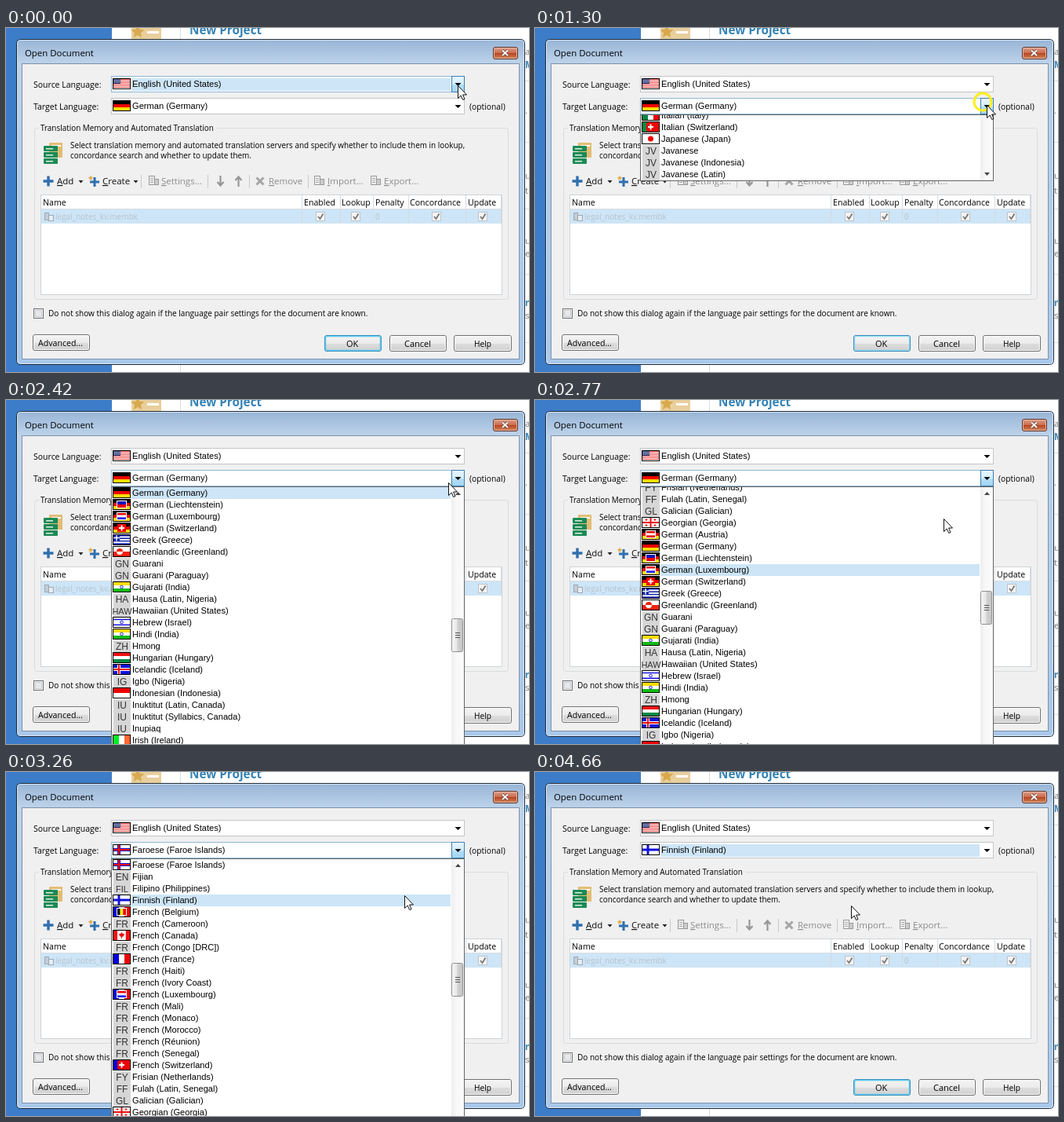
Recreate the animation shown at these times as an HTML page. Size 667 by 438 pixels, loop 4730 ms.

```html
<!DOCTYPE html>
<html lang="en">
<head>
<meta charset="utf-8">
<title>Open Document</title>
<style>
html, body { margin: 0; width: 100%; height: 100%; overflow: hidden; background: #fff; }
svg { display: block; width: 667px; height: 438px; }
text { white-space: pre; }
.ui { font-family: "Open Sans", "Noto Sans", sans-serif; }
.ls { font-family: "Liberation Sans", Arial, sans-serif; font-size: 11.1px; }
</style>
</head>
<body>
<svg id="stage" viewBox="0 0 667 438"></svg>
<script>
const LOOP = 4730, ROW = 15, LIST_H = 452, GERMAN = 23;
const PICK = '#cde5f7';

// name, flag: layers of "kind colours", or a letter code
const langs = `Faroese (Faroe Islands);x #fff #11c #e11
Fijian;EN
Filipino (Philippines);FIL
Finnish (Finland);x #fff #11d
French (Belgium);v #00d #fff #e00|+v #000 #fe0 #e00
French (Cameroon);FR
French (Canada);v #e11 #fff #fff #e11|m #e11
French (Congo [DRC]);FR
French (France);v #00d #fff #e00
French (Haiti);FR
French (Ivory Coast);FR
French (Luxembourg);v #00d #fff #e00|+h #e00 #fff #22e
French (Mali);FR
French (Monaco);FR
French (Morocco);FR
French (Réunion);FR
French (Senegal);FR
French (Switzerland);v #00d #e00 #e00|+s #e00
Frisian (Netherlands);FY
Fulah (Latin, Senegal);FF
Galician (Galician);GL
Georgian (Georgia);g #e11
German (Austria);h #000 #e00 #fd0|+h #e00 #fff #e00
German (Germany);h #000 #e00 #fd0
German (Liechtenstein);h #000 #e00 #fd0|+h #11b #e00
German (Luxembourg);h #000 #e00 #fd0|+h #e00 #fff #22e
German (Switzerland);h #000 #e00 #fd0|+s #e00
Greek (Greece);h #12a #fff #12a #fff #12a #fff #12a|k #12a
Greenlandic (Greenland);h #fff #e21|d #e21
Guarani;GN
Guarani (Paraguay);GN
Gujarati (India);h #fd0 #fff #1b1|r #22c
Hausa (Latin, Nigeria);HA
Hawaiian (United States);HAW
Hebrew (Israel);h #fff #11d #fff #fff #fff #11d #fff|r #11d
Hindi (India);h #fd0 #fff #1b1|r #22c
Hmong;ZH
Hungarian (Hungary);h #e11 #fff #084
Icelandic (Iceland);x #11d #fff #e11
Igbo (Nigeria);IG
Indonesian (Indonesia);h #e00 #fff
Inuktitut (Latin, Canada);IU
Inuktitut (Syllabics, Canada);IU
Inupiaq;IU
Irish (Ireland);v #0e2 #fff #f63
isiXhosa (South Africa);XH
isiZulu (South Africa);ZU
Italian (Italy);v #084 #fff #e00
Italian (Switzerland);v #084 #e00 #e00|+s #e00
Japanese (Japan);h #fff|o #e00
Javanese;JV
Javanese (Indonesia);JV
Javanese (Latin);JV`.split('\n').map(s => s.split(';'));

const rect = (x, y, w, h, fill, more = '') =>
  `<rect x="${x}" y="${y}" width="${w}" height="${h}" fill="${fill}" ${more}/>`;
const frame = (x, y, w, h, fill, line, r = 0, more = '') =>
  rect(x + .5, y + .5, w - 1, h - 1, fill, `stroke="${line}" rx="${r}" ${more}`);
const path = (d, fill, more = '') => `<path d="${d}" fill="${fill}" ${more}/>`;
const line = (d, color, w = 1, more = '') => path(d, 'none', `stroke="${color}" stroke-width="${w}" ${more}`);
const dot = (x, y, r, fill, more = '') => `<circle cx="${x}" cy="${y}" r="${r}" fill="${fill}" ${more}/>`;
const ui = (s, x, y, size = 10, fill = '#000', more = '') =>
  `<text class="ui" x="${x}" y="${y}" font-size="${size}" fill="${fill}" ${more}>${s}</text>`;
const item = (s, x, y) => `<text class="ls" x="${x}" y="${y}">${s}</text>`;
const group = (s, more = '') => `<g ${more}>${s}</g>`;
const grad = (id, dir, ...stops) => `<linearGradient id="${id}" ${dir === 'v' ? 'x2="0" y2="1"' : ''}>` +
  stops.map(([o, c]) => `<stop offset="${o}" stop-color="${c}"/>`).join('') + '</linearGradient>';

function stripes(dir, cols, x, y, w, h) {
  const n = cols.length;
  return cols.map((c, i) => dir === 'h'
    ? rect(x, y + i * h / n, w, h / n, c)
    : rect(x + i * w / n, y, w / n, h, c)).join('');
}

const plus = (x, y, r, c, w) => line(`M${x - r} ${y}h${2 * r}M${x} ${y - r}v${2 * r}`, c, w);

function layer(spec) {
  const [kind, ...c] = spec.split(' ');
  switch (kind) {
    case 'h': case 'v': return stripes(kind, c, 1, 1, 21, 12);
    case '+h': case '+v':
      return rect(5, 2, 13, 10, '#fff') + stripes(kind[1], c, 6, 3, 11, 8);
    case '+s': return rect(6, 2, 11, 10, c[0]) + plus(11.5, 7, 3.5, '#fff', 2);
    case 'x': return rect(1, 1, 21, 12, c[0]) + line('M1 7h21M8 1v12', c[1], c[2] ? 4 : 3) +
      (c[2] ? line('M1 7h21M8 1v12', c[2], 2) : '');
    case 'g': return rect(1, 1, 21, 12, '#fff') + line('M1 7h21M11.5 1v12', c[0], 2) +
      [6, 17].map(x => plus(x, 3.5, 1.5, c[0], 1) + plus(x, 10.5, 1.5, c[0], 1)).join('');
    case 'k': return rect(1, 1, 8, 7, c[0]) + plus(5, 4.5, 4, '#fff', 1.4);
    case 'd': return path('M5 7a4 4 0 0 1 8 0z', c[0]) + path('M5 7a4 4 0 0 0 8 0z', '#fff');
    case 'o': return dot(11.5, 7, 3.5, c[0]);
    case 'r': return dot(11.5, 7, 1.8, '#fff', `stroke="${c[0]}"`);
    case 'm': return path('M11.5 3l1.5 2 2 0-1 3-2 1v2h-1v-2l-2-1-1-3 2 0z', c[0]);
    case 'u': return stripes('h', Array.from({length: 12}, (_, i) => i % 2 ? '#fff' : '#e44'), 1, 1, 21, 12) +
      rect(1, 1, 9, 6, '#458') + line('M2 2.5h7M2 4.5h7', '#bbd', 1, 'stroke-dasharray="1 1"');
  }
}

function flag(spec, x, y) {
  const art = /^[A-Z]+$/.test(spec)
    ? rect(1, 0, 22, 15, '#d6d6d6') +
      `<text class="ls" x="12" y="11.5" text-anchor="middle" fill="#333" style="font-size:${spec.length > 2 ? 11 : 12}px">${spec}</text>`
    : spec.split('|').map(layer).join('') + frame(0, 0, 23, 14, 'none', '#000');
  return group(art, `transform="translate(${x} ${y})"`);
}

function combo(id, y) {
  return frame(134, y, 451, 21, '#fff', '#c3c5c9') +
    rect(160, y + 3, 407, 16, PICK, `id="${id}Pick"`) +
    `<g id="${id}Hot">` + frame(134, y, 451, 21, 'none', '#8fb8d6') +
    frame(568, y, 17, 21, 'url(#hot)', '#3c7fb1') + '</g>' +
    path(`M572.5 ${y + 9}h8l-4 4z`, '#000') + `<g id="${id}Value"></g>`;
}

function button(s, x, y, w, tx, size, border = '#707070') {
  return frame(x, y, w, 21, 'url(#btn)', border, 2.5) +
    frame(x + 1, y + 1, w - 2, 19, 'none', '#fbfbfb', 2) + ui(s, tx, y + 14.5, size);
}

const tool = (s, x, color = '#8b8b8b') =>
  ui(`<tspan text-decoration="underline">${s[0]}</tspan>${s.slice(1)}`, x, 199, 11.5, color);
const sheet = (x, y) => frame(x, y, 8, 12, '#eee', '#999') +
  line(`M${x + 2} ${y + 3.5}h4m-4 2.5h4m-4 2.5h4`, '#aaa') + frame(x + 7, y + 4, 6, 8, '#ccc', '#999');
const check = x => frame(x - 6, 234, 12, 12, '#f4f4f4', '#bfc3c7') +
  line(`M${x - 3} 240l2.5 3 4-6.5`, '#777', 1.8);
const star = (x, y, r, c) => path('M' + Array.from({length: 10}, (_, i) => {
  const a = i * Math.PI / 5 - Math.PI / 2, k = i % 2 ? r * .45 : r;
  return `${(x + k * Math.cos(a)).toFixed(1)} ${(y + k * Math.sin(a)).toFixed(1)}`;
}).join('L') + 'z', c);

function backdrop() {
  const bits = [['a', 34, 0], ['M', 51, 1], ['.', 109, 0], ['ur', 192, 0], ['t', 211, 0],
    ['u', 275, 0], ['e', 291, 0], ['r', 354, 1], ['s', 370, 0]];
  return rect(0, 0, 667, 438, '#fff') + rect(0, 0, 135, 438, '#3d7cc8') +
    rect(160, 0, 38, 14, '#e8cf9c') + rect(180, 4, 15, 3, '#fff') + star(168, 5, 9, '#d9a94e') +
    line('M222.5 0V438', '#dcdcdc') +
    ui('New Project', 234, 8, 15.3, '#3583b5', 'font-weight="700"') +
    line('M660 67.5h7M660 145.5h7M660 230.5h7M660 313.5h7M660 400.5h7', '#ddd') +
    bits.map(([s, y, b]) => ui(s, 662, y, 11.5, b ? '#3583b5' : '#777', b ? 'font-weight="700"' : '')).join('');
}

function dialog() {
  const heads = [['Name', 47], ['Enabled', 380], ['Lookup', 428], ['Penalty', 471], ['Concordance', 515], ['Update', 589]];
  return frame(13, 14, 649, 415, 'url(#glass)', '#1b2836', 5) +
    frame(14, 15, 647, 413, 'none', '#d6e6f6', 4) +
    ui('Open Document', 24, 36, 11.4) +
    frame(621, 24, 32, 16, 'url(#close)', '#5f3328', 2.5) + frame(622, 25, 30, 14, 'none', '#eab7a4', 2) +
    line('M633 28.500l7 6.500m0-6.500l-7 6.500', '#5e3a33', 3.400) + line('M633 28.500l7 6.500m0-6.500l-7 6.500', '#fff', 2) +
    frame(20, 45, 635, 377, '#f0f0f0', '#7c92aa') +
    ui('Source Language:', 35, 76, 10.5) + ui('Target Language:', 35, 104, 10.5) +
    ui('(optional)', 591, 104, 10.3) +
    combo('src', 61) + combo('dst', 89) +
    frame(36, 127, 605, 219, 'none', '#d8dbde', 3) + rect(42, 124, 227, 7, '#f0f0f0') +
    ui('Translation Memory and Automated Translation', 44, 131, 9.92) +
    rect(55, 146, 17, 19, '#e2bd75') + rect(58, 149, 12, 2, '#fff') +
    [0, 1, 2].map(i => rect(48, 150 + i * 8, 18, 7, '#1c8a55', 'rx="1"') + rect(51, 153 + i * 8, 9, 1.5, '#d9f0e2')).join('') +
    ui('Select translation memory and automated translation servers and specify whether to include them in lookup,', 82, 153, 9.93) +
    ui('concordance search and whether to update them.', 82, 166, 9.93) +
    plus(54, 195, 6.5, '#2f6fad', 3.4) + tool('Add', 65, '#111') + path('M92.5 194h6l-3 3.5z', '#222') +
    plus(113, 196, 6, '#2f6fad', 3) + star(108, 191, 3.6, '#e0ab4a') + tool('Create', 123, '#111') + path('M162.5 194h6l-3 3.5z', '#222') +
    line('M172.5 187v17M257.5 187v17M310.5 187v17M385.5 187v17', '#c9c9c9') +
    sheet(182, 188) + tool('Settings...', 198) +
    line('M273.5 188v12m-4-4l4 4.5 4-4.5', '#979797', 2.2) + line('M296.5 202v-12m-4 4l4-4.5 4 4.5', '#979797', 2.2) +
    line('M319.5 190.5l9 9m0-9l-9 9', '#a5a5a5', 3) + tool('Remove', 335) +
    sheet(393, 188) + tool('Import...', 410) + sheet(465, 188) + tool('Export...', 482) +
    frame(44, 212, 589, 128, '#fff', '#cfd4d9') +
    rect(45, 231, 587, 18, PICK) + line('M45 230.5h587', '#d9dde2') +
    line('M377.5 213v36M426.5 213v36M468.5 213v36M513.5 213v36M586.5 213v36M631.5 213v36', '#d5dbe1') +
    heads.map(([s, x]) => ui(s, x, 226, 10.6)).join('') +
    frame(49, 235, 6, 10, '#c3cdd6', '#9ba8b3') + frame(54, 238, 7, 8, '#e8edf1', '#9ba8b3') +
    ui('legal_notes_kv.membk', 63, 244, 10, '#b6c3ce') + ui('0', 471, 244, 10, '#b6c3ce') +
    [401, 446, 549, 608].map(check).join('') +
    frame(35, 357, 13, 13, '#f5f5f5', '#6f7072') + frame(37, 359, 9, 9, '#e6e8ea', '#c4c8cc') +
    ui('Do not show this dialog again if the language pair settings for the document are known.', 54, 367, 10.03) +
    button('Advanced...', 34, 390, 73, 41, 10.6) +
    button('OK', 406, 391, 73, 434, 11, '#3c7fb1') +
    frame(407, 392, 71, 19, 'none', '#48c8f2', 2, 'id="glow" stroke-width="1.6"') +
    button('Cancel', 489, 391, 73, 508, 11) + button('Help', 571, 391, 74, 597, 10.2);
}

function list() {
  const rows = langs.map(([name, spec], i) =>
    flag(spec, 136, i * ROW) + item(name, 161, i * ROW + 11)).join('');
  const grips = [0, 3, 6].map(d => rect(573, 18 + d, 6, 1, '#555')).join('');
  return '<g id="list" clip-path="url(#cut)">' + rect(134, 110, 451, 328, '#fff') +
    '<g id="slide"><g clip-path="url(#rows)">' + rect(160, 0, 407, ROW, PICK, 'id="hover"') +
    `<g id="items">${rows}</g></g>` +
    rect(568, 111, 16, 450, 'url(#track)') + path('M573 121l3.5-4 3.5 4z', '#444') + path('M573 551h7l-3.5 4z', '#444') +
    `<g id="thumb">${frame(568, 0, 15, 43, 'url(#thumbFill)', '#8f8f8f', 2)}${grips}</g></g>` +
    '</g><rect id="edge" x="134.5" y="110.5" width="450" fill="none" stroke="#646464"/>';
}

const stage = document.getElementById('stage');
stage.innerHTML = '<defs>' +
  grad('glass', 'v', [0, '#98b5d6'], [.075, '#bdd3ea'], [.3, '#b3cfec'], [1, '#a9c8ea']) +
  grad('close', 'v', [0, '#dfa28c'], [.48, '#cb6c4e'], [.5, '#b5431f'], [1, '#d28a5c']) +
  grad('hot', 'v', [0, '#eaf6fd'], [.5, '#d2edfb'], [.52, '#b5e0f7'], [1, '#a2d4f1']) +
  grad('btn', 'v', [0, '#f4f4f4'], [.5, '#ebebeb'], [.52, '#dddddd'], [1, '#cfcfcf']) +
  grad('track', 'h', [0, '#eeeeee'], [.4, '#f8f8f8'], [1, '#fafafa']) +
  grad('thumbFill', 'h', [0, '#f6f6f6'], [.48, '#e6e6e6'], [.52, '#d2d2d2'], [1, '#c4c4c4']) +
  '<clipPath id="cut"><rect id="cutBox" x="134" y="110" width="451"/></clipPath>' +
  '<clipPath id="rows"><rect x="135" y="111" width="433" height="450"/></clipPath></defs>' +
  backdrop() + dialog() + list() +
  dot(0, 0, 11, 'none', 'id="ring" stroke="#ffee1a" stroke-width="3"') +
  path('M.5 .5V16.5L4.2 13L6.7 18.5L9 17.5L6.6 12H11.5z', '#fff', 'id="cursor" stroke="#111"');

const $ = id => document.getElementById(id);
const set = (id, name, v) => $(id).setAttribute(name, v);
const show = (id, v) => set(id, 'opacity', +v);
const move = (id, x, y) => set(id, 'transform', `translate(${x} ${y})`);
const ramp = (t, a, b) => Math.max(0, Math.min(1, (t - a) / (b - a)));

// time, x, y of the pointer tip
const route = [[0, 576, 73], [70, 576, 73], [530, 576, 86], [1090, 576, 98], [2350, 576, 98],
  [2420, 564, 105], [2490, 548, 121], [2560, 532, 140], [2630, 521, 151], [3190, 521, 151],
  [3260, 508, 157], [3330, 480, 166], [3400, 450, 173], [3470, 425, 176], [3610, 425, 176],
  [3680, 410, 173], [3750, 404, 170], [3820, 404, 170], [3890, 403, 170], [LOOP, 403, 170]];

function pointer(t) {
  const i = Math.max(1, route.findIndex(p => p[0] >= t));
  const [a, b] = [route[i - 1], route[i]], k = ramp(t, a[0], b[0]);
  return [1, 2].map(n => Math.round(a[n] + (b[n] - a[n]) * k));
}

const values = {};
function value(id, name, spec, y) {
  if (values[id] === name) return;
  values[id] = name;
  $(id + 'Value').innerHTML = flag(spec, 136, y + 3) + item(name, 161, y + 14);
}

// the screen refreshes in 70 ms steps
const step = t => t < 530 ? Math.min(420, Math.floor(t / 70) * 70) : 530 + Math.floor((t - 530) / 70) * 70;

function draw(time) {
  const t = step(time), [x, y] = pointer(t);
  const open = t >= 1300 && t < 4450, done = t >= 4450;
  const press = (t >= 1160 && t < 1440) || (t >= 4380 && t < 4660);

  move('cursor', x, y);
  move('ring', x - 5, y - 4);
  show('ring', press);

  value('src', 'English (United States)', 'u', 61);
  const chosen = done ? 3 : t >= 3050 ? 0 : GERMAN;
  value('dst', ...langs[chosen], 89);
  show('srcPick', t < 1230);
  show('dstPick', done);
  show('srcHot', 1 - ramp(t, 350, 700));
  show('dstHot', done ? 0 : ramp(t, 700, 1020));
  show('glow', .7 + .2 * Math.cos(t / LOOP * 10 * Math.PI));

  set('list', 'visibility', open ? 'visible' : 'hidden');
  set('edge', 'visibility', open ? 'visible' : 'hidden');
  if (!open) return;

  const h = t < 1370 ? 85 : t < 1440 ? 268 : LIST_H;
  const scroll = Math.floor(GERMAN * ROW * ramp(t, 2701, 3050));
  const top = 111 - GERMAN * ROW + scroll;
  const over = Math.floor((y - 111) / ROW);
  const row = t < 2490 ? GERMAN : t < 2770 ? GERMAN + over : t < 3050 ? GERMAN + 2 : t < 3260 ? 0 : over;
  set('cutBox', 'height', h);
  set('edge', 'height', h - 1);
  move('slide', 0, h - LIST_H);
  move('items', 0, top);
  move('hover', 0, top + row * ROW);
  move('thumb', 0, t < 2770 ? 278 : 243);
}

const start = performance.now();
function play(now) {
  draw(Math.max(0, now - start) % LOOP);
  requestAnimationFrame(play);
}
draw(0);
requestAnimationFrame(play);
</script>
</body>
</html>
```
